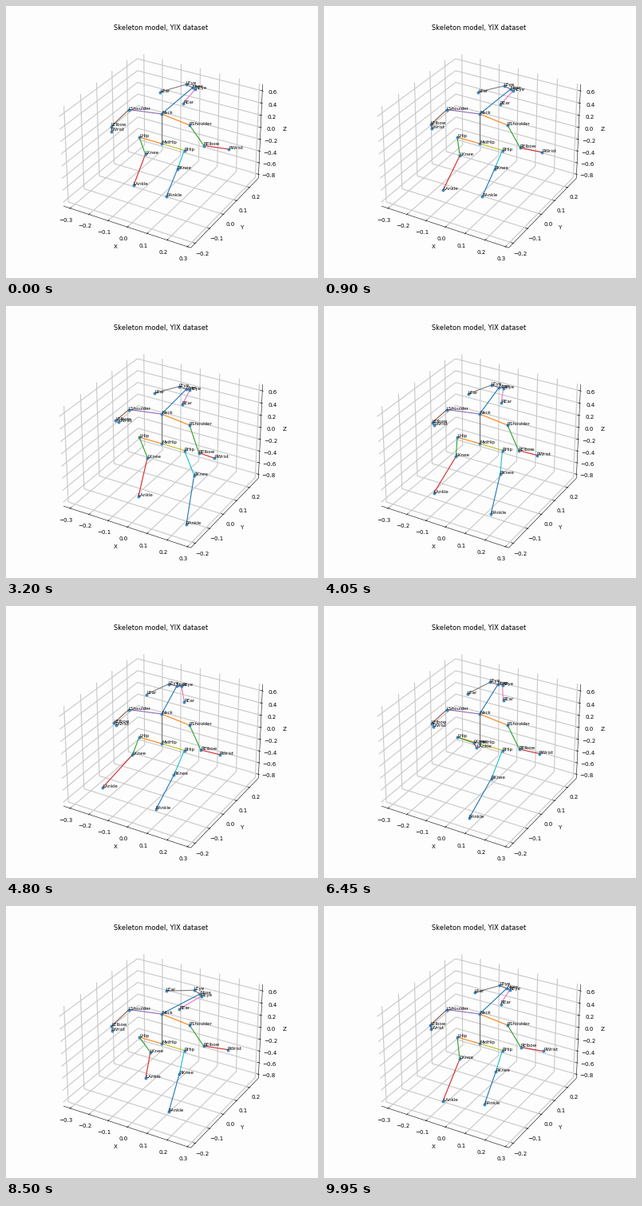
Animation, 391 px wide and 340 px high, one loop 10 s. Source, as a matplotlib script:

```python
import math

import matplotlib.pyplot as plt
import numpy as np
from matplotlib.animation import FuncAnimation
from matplotlib.collections import LineCollection

W, H, DPI = 391, 340, 50
FRAMES, STEP = 200, 50
plt.rcParams["font.family"] = "DejaVu Sans"

# --- perspective box -------------------------------------------------------
HALF = np.array([0.5952, 0.5952, 0.4464])
LOW = np.array([-0.336, -0.230, -0.868])
HIGH = np.array([0.316, 0.272, 0.704])
CENTER, SCALE, DIST = (196.4, 174.3), 1535, 10
ELEV, AZIM = math.radians(30), math.radians(-60)
VIEW = np.array([math.cos(ELEV) * math.cos(AZIM),
                 math.cos(ELEV) * math.sin(AZIM), math.sin(ELEV)])
RIGHT = np.array([-math.sin(AZIM), math.cos(AZIM), 0])
UP = np.cross(VIEW, RIGHT)


def project(p):
    p = np.asarray(p, float)
    k = SCALE / (DIST - VIEW @ p)
    return CENTER[0] + k * (RIGHT @ p), CENTER[1] - k * (UP @ p)


def box_coord(axis, value):
    share = (value - LOW[axis]) / (HIGH[axis] - LOW[axis])
    return HALF[axis] * (2 * share - 1)


# Signs of the corners each grid line runs through, per axis.
GRID = [[(0, -1, -1), (0, 1, -1), (0, 1, 1)],
        [(1, 0, -1), (-1, 0, -1), (-1, 0, 1)],
        [(1, 1, 0), (-1, 1, 0), (-1, -1, 0)]]
TICKS = [np.arange(-3, 4) / 10, np.arange(-2, 3) / 10, np.arange(-4, 4) / 5]
TICK_DIR = [1, 0, 0]

fig = plt.figure(figsize=(W / DPI, H / DPI), dpi=DPI, facecolor="#fdfdfd")
ax = fig.add_axes([0, 0, 1, 1])
ax.set(xlim=(0, W), ylim=(H, 0))
ax.axis("off")


def draw_axis(axis):
    edge = np.array(GRID[axis][0])
    unit = np.eye(3)[axis]
    grid = []
    marks = [[project((edge + s * unit) * HALF) for s in (-1, 1)]]
    for value in TICKS[axis]:
        along = unit * box_coord(axis, value)
        grid.append([project(c * HALF + along) for c in np.array(GRID[axis])])
        start = edge * HALF + along
        d = TICK_DIR[axis]
        out = np.eye(3)[d] * edge[d] * HALF[d]
        marks.append([project(start + out * k) for k in (0.016, -0.032)])
        x, y = project(start + edge * HALF * 0.108)
        label = f"{value:.1f}".replace("-", "\u2212")
        ax.text(x, y + 0.9, label, size=10.3, ha="center", va="top")
    ax.add_collection(LineCollection(grid, colors="#c8c8c8",
                                     linewidths=1.6, zorder=1))
    ax.add_collection(LineCollection(marks, colors="black",
                                     linewidths=0.8, zorder=2))
    x, y = project(edge * HALF * 1.25)
    ax.text(x, y, "XYZ"[axis], size=10.3, ha="center", va="center")


for n in range(3):
    draw_axis(n)
ax.text(193.7, 29.6, "Skeleton model, YIX dataset", size=12.1, ha="center")

# --- skeleton --------------------------------------------------------------
# A few key poses of the parts that lead; all other joints follow them.
KEY_AT = [0, 37, 64, 96, 129, 170, 199]
NOSE = [(234, 102), (234, 106), (226, 104), (214, 100),
        (218, 98), (243, 110), (229, 103)]
LEFT_FOOT = [(160, 224), (133, 239), (166, 238), (121, 227),
             (191, 177), (175, 215), (149, 244)]
RIGHT_FOOT = [(201, 238), (200, 235), (226, 273), (188, 254),
              (182, 265), (204, 257), (201, 248)]
ARM_SWING = [0, 11, 18, 11, 9, 1, 4]
STRIDE = 16  # frames

BONES = [("Neck", "Nose"), ("Neck", "RShoulder"), ("RShoulder", "RElbow"),
         ("RElbow", "RWrist"), ("Neck", "LShoulder"), ("LShoulder", "LElbow"),
         ("LElbow", "LWrist"), ("Neck", "MidHip"), ("MidHip", "RHip"),
         ("RHip", "RKnee"), ("RKnee", "RAnkle"), ("MidHip", "LHip"),
         ("LHip", "LKnee"), ("LKnee", "LAnkle"), ("Nose", "REye"),
         ("Nose", "LEye"), ("REye", "REar"), ("LEye", "LEar")]


def head(nose):
    x, y = nose
    turn, nod = x - 228, y - 103
    return {"Nose": (x, y),
            "REye": (x + 4 - 0.15 * turn, y + 1.5 + 0.08 * turn),
            "LEye": (x - 9 + 0.1 * turn, y - 3.5 - 0.08 * turn),
            "REar": (221.5 - 0.6 * nod, 122.5 + 0.9 * nod),
            "LEar": (188 + 0.85 * turn, 108.4 - 0.15 * turn)}


def arms(swing):
    return {"RShoulder": (230, 149), "LShoulder": (154, 129.5),
            "RElbow": (248 - 0.35 * swing, 174.5 + 0.5 * swing),
            "RWrist": (279 - swing, 179 + 0.62 * swing),
            "LElbow": (132 + 0.3 * swing, 150.5 - 0.4 * swing),
            "LWrist": (132 + 0.5 * swing, 156.5 - 0.65 * swing)}


def legs(left, right):
    lx, ly = left - (156, 223)
    rx, ry = right - (200, 253)
    return {"RHip": (223.5, 180.5), "LHip": (167, 164),
            "RKnee": (215 + 0.5 * rx + 0.05 * ry + 0.01 * rx * rx,
                      209 + 0.32 * ry - 0.15 * rx),
            "LKnee": (173 + 0.42 * lx, 185 + 0.3 * ly),
            "RAnkle": right, "LAnkle": left}


def pose(frame):
    i = min(np.searchsorted(KEY_AT, frame, side="right") - 1, len(KEY_AT) - 2)
    span = KEY_AT[i + 1] - KEY_AT[i]
    t = (frame - KEY_AT[i]) / span
    ease = (1 - math.cos(math.pi * t)) / 2
    theta = 2 * math.pi * round(span / STRIDE) * t

    def between(keys):
        a, b = np.array(keys[i:i + 2], float)
        return a + (b - a) * ease

    def cycle(keys, sway):
        """Loop around the mean, passing through the keys."""
        mean = np.mean(keys, axis=0)
        return (mean + (between(keys) - mean) * math.cos(theta)
                + np.array(sway) * math.sin(theta))

    return {"Neck": (195, 135), "MidHip": (195, 172),
            **head(between(NOSE)),
            **arms(cycle(ARM_SWING, -4)),
            **legs(cycle(LEFT_FOOT, (-12, 6)), cycle(RIGHT_FOOT, (12, -6)))}


start = pose(0)
bones = LineCollection([], colors=[f"C{n % 10}" for n in range(len(BONES))],
                       linewidths=1.6, zorder=4)
ax.add_collection(bones)
dots = ax.scatter(*np.array(list(start.values())).T, s=20, color="C0",
                  alpha=0.8, linewidths=1.2, zorder=5)
labels = {name: ax.text(*p, name, size=8.2, zorder=6)
          for name, p in start.items()}


def update(frame):
    joints = pose(frame)
    bones.set_segments([(joints[a], joints[b]) for a, b in BONES])
    dots.set_offsets(list(joints.values()))
    for name, p in joints.items():
        labels[name].set_position(p)
    return [bones, dots, *labels.values()]


anim = FuncAnimation(fig, update, frames=FRAMES, interval=STEP,
                     repeat=True, repeat_delay=0)
plt.show()
```
